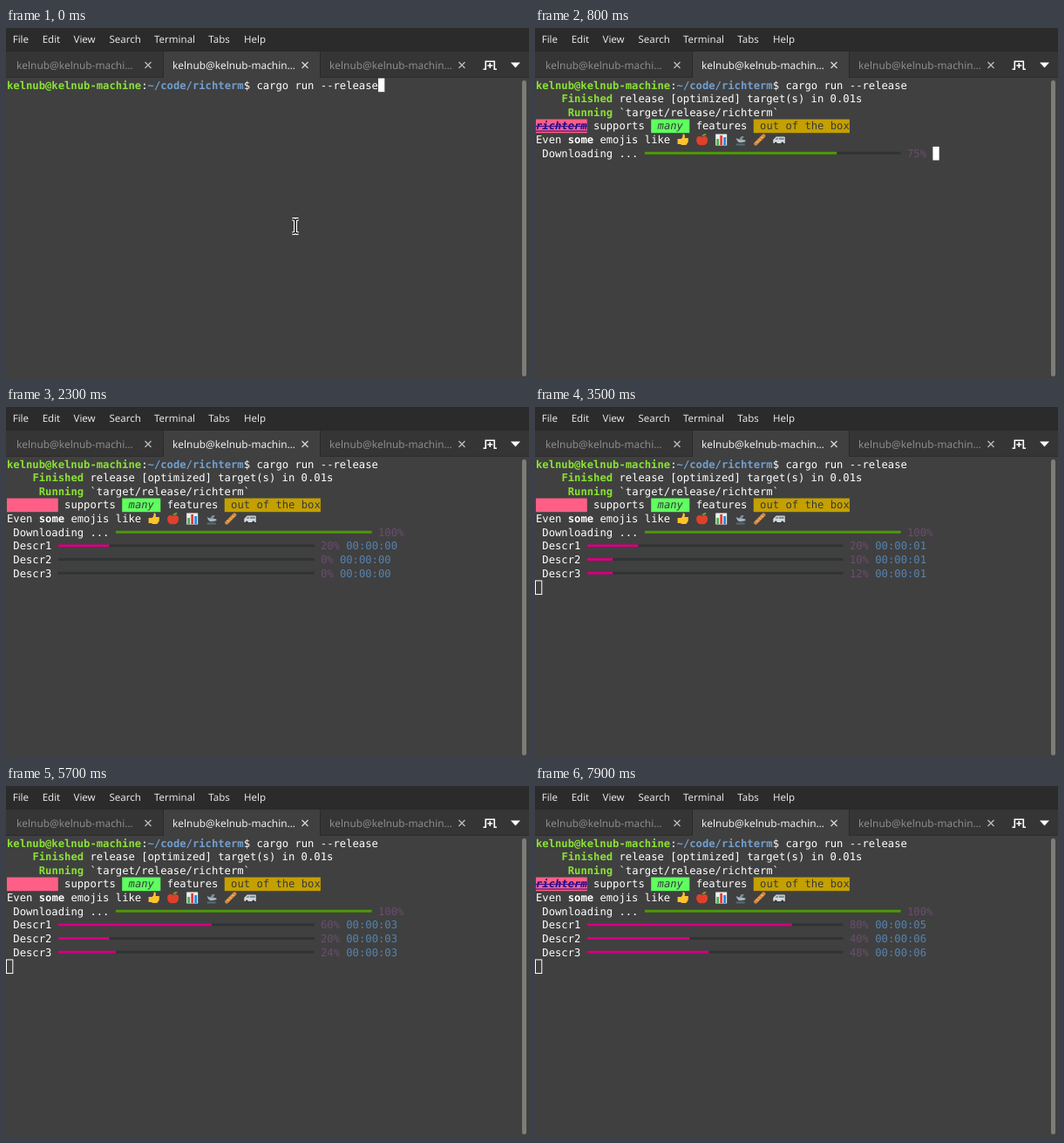
Animation, 600 px wide and 402 px high, one loop 8000 ms. Source, as an HTML page:

```html
<!DOCTYPE html>
<html lang="en">
<head>
<meta charset="utf-8">
<title>Terminal</title>
<style>
  html, body { margin: 0; width: 100%; height: 100%; overflow: hidden; background: #404040; }
  svg { display: block; width: 100vw; height: 100vh; }
  text { white-space: pre; text-rendering: geometricPrecision; }
  .ui { font: 11.5px "Noto Sans", "Open Sans", sans-serif; fill: #e4e4e4; }
  .tab { font-size: 11.85px; fill: #8c8c8c; }
  .tab.on { fill: #f0f0f0; }
  .term { font: 12.2px "DejaVu Sans Mono", monospace; fill: #fff; }
  .bold { font-weight: bold; }
  .green { font-weight: bold; fill: #8ae234; }
  .path { font-weight: bold; fill: #729fcf; }
  .dark { fill: #373a3b; }
  .slant { font-style: italic; }
  .pct { fill: #6c4c70; }
  .time { fill: #5583b0; }
  .fancy { font-weight: bold; font-style: italic; fill: #1a0a8a; }
</style>
</head>
<body>
<svg id="stage" viewBox="0 0 600 402" xmlns="http://www.w3.org/2000/svg">
  <defs>
    <path id="beam" d="M-3.5 -8H-1.5L0 -7L1.5 -8H3.5M0 -7V7M-3.5 8H-1.5L0 7L1.5 8H3.5"/>
  </defs>
  <rect width="600" height="402" fill="#404040"/>
  <rect width="600" height="57" fill="#2b2b2b"/>
  <rect y="26" width="600" height="31" fill="#353535"/>
  <rect x="181" y="26" width="179" height="31" fill="#404040"/>
  <path d="M180.5 26V57M360.5 26V57M0 26.5H600" stroke="#292929"/>
  <path d="M0 56.5H181M360 56.5H600" stroke="#2c2c2c"/>
  <g id="chrome"></g>
  <path d="M547.5 47.3H550.3V38.2H560.3V47.3H563M552.3 43H558.3M555.3 40V46" fill="none" stroke="#fff" stroke-width="1.6"/>
  <path d="M579 39.5H590L584.5 45.5Z" fill="#fff"/>
  <rect x="592" y="60" width="5" height="339" rx="2.5" fill="#7e7c79"/>
  <g id="screen"></g>
  <g id="emojis">
    <path d="M-6 -1H-2C0 -3 0 -4 0 -6.5C2 -7 3 -5 2 -2H6Q7 0 6 1Q7 3 5 4Q5 6 3 6H-1L-3 5H-6Z" fill="#fcc32c"/>
    <g>
      <path d="M0 -3C3 -5 6.5 -4 6.5 0C6.5 4 3.5 7.5 0 6C-3.5 7.5 -6.5 4 -6.5 0C-6.5 -4 -3 -5 0 -3Z" fill="#e0402a"/>
      <path d="M0 -3Q0 -5 -1 -6.5" stroke="#70442a" fill="none"/>
      <path d="M0 -4Q1 -7.5 5 -7Q4 -3.5 0 -4Z" fill="#69a03a"/>
    </g>
    <g>
      <rect x="-6.5" y="-6.5" width="13" height="13" fill="#eceff1"/>
      <path d="M-4 6V-1" stroke="#4caf50" stroke-width="2.8"/>
      <path d="M0 6V-5" stroke="#e53935" stroke-width="2.8"/>
      <path d="M4 6V-3" stroke="#1e88e5" stroke-width="2.8"/>
    </g>
    <g>
      <path d="M-5 -2L-3 -1L-1 0H4Q6 0 6 2Q3 3.5 -2 3Q-4 2 -5 -2Z" fill="#a4b4bc"/>
      <path d="M-2 0L1 -4L4 -4L2 0Z" fill="#78909c"/>
      <path d="M-5 5.5H5" stroke="#546e7a" stroke-width="2"/>
    </g>
    <g transform="rotate(-45)">
      <rect x="-8.5" y="-2.1" width="17" height="4.2" rx="2.1" fill="#d58a3c"/>
      <path d="M-4.5 -1L-3 1M-0.7 -1L0.7 1M3 -1L4.5 1" stroke="#f2c483"/>
    </g>
    <g>
      <path d="M-6.5 3V0L-3 -3.5H6Q7 -3.5 7 -2.5V4H-6Z" fill="#d5dadd"/>
      <path d="M-4.5 0L-2.5 -2.3H-1V0ZM0 -2.3H6V0H0Z" fill="#7f8e96"/>
      <circle cx="-3.5" cy="4" r="1.4" fill="#30363a"/>
      <circle cx="4" cy="4" r="1.4" fill="#30363a"/>
    </g>
  </g>
  <rect id="cursor" width="7.3" height="15.6"/>
  <g id="mouse" fill="none">
    <use href="#beam" stroke="#fff" stroke-width="4"/>
    <use href="#beam" stroke="#1c1c1c" stroke-width="1.7"/>
  </g>
</svg>
<script>
const LOOP = 8000, CELL = 7.345, ROW = 15.65, BAR_CELLS = 40;
const STEPS = [2200, 2700, 3000, 3600, 4200, 4700, 5300, 5800, 6300, 6800, 7300, 7800];
const $ = id => document.getElementById(id);
const colX = c => 1 + c * CELL;
const rowY = r => 57.6 + r * ROW;

function add(parent, tag, attrs, label) {
  const el = document.createElementNS("http://www.w3.org/2000/svg", tag);
  set(el, attrs);
  if (label !== undefined) el.textContent = label;
  return parent.appendChild(el);
}
function set(el, attrs) {
  for (const k in attrs) el.setAttribute(k, attrs[k]);
}
const show = (el, on) => el.setAttribute("visibility", on ? "inherit" : "hidden");
const group = () => add($("screen"), "g", {});
const put = (g, row, col, label, cls = "") =>
  add(g, "text", { x: colX(col), y: rowY(row) + 11.9, class: "term " + cls }, label);
const fillCells = (g, row, col, n, fill) =>
  add(g, "rect", { x: colX(col), y: rowY(row), width: n * CELL, height: ROW, fill });

// Window chrome
[["File", 7.7], ["Edit", 41.7], ["View", 77.5], ["Search", 118.5], ["Terminal", 170], ["Tabs", 232.3], ["Help", 273]]
  .forEach(([label, x]) => add($("chrome"), "text", { x, y: 17.3, class: "ui" }, label));
[["kelnub@kelnub-machi…", 12, ""], ["kelnub@kelnub-machin…", 191, "on"], ["kelnub@kelnub-machin…", 371, ""]]
  .forEach(([label, x, cls], i) => {
    add($("chrome"), "text", { x, y: 46.5, class: "ui tab " + cls }, label);
    add($("chrome"), "path", {
      d: `M${159.5 + i * 180} 39l7 7m0 -7l-7 7`, stroke: cls ? "#d8d8d8" : "#bdbdbd", "stroke-width": 1.3
    });
  });

// Terminal lines
const prompt = group();
put(prompt, 0, 0, "kelnub@kelnub-machine", "green");
put(prompt, 0, 21, ":");
put(prompt, 0, 22, "~/code/richterm", "path");
put(prompt, 0, 37, "$ cargo run --release");

const build = group();
put(build, 1, 4, "Finished", "green");
put(build, 1, 13, "release [optimized] target(s) in 0.01s");
put(build, 2, 5, "Running", "green");
put(build, 2, 13, "`target/release/richterm`");

const styled = group();
fillCells(styled, 3, 0, 8, "#ff5f87");
const blinker = add(styled, "g", {});
put(blinker, 3, 0, "richterm", "fancy");
for (const dy of [8, 13.5]) {
  add(blinker, "rect", { x: 1, y: rowY(3) + dy - 0.6, width: 8 * CELL, height: 1.2, fill: "#3a1090" });
}
put(styled, 3, 9, "supports");
fillCells(styled, 3, 18, 6, "#5fff5f");
put(styled, 3, 19, "many", "dark slant");
put(styled, 3, 25, "features");
fillCells(styled, 3, 34, 15, "#c4a000");
put(styled, 3, 35, "out of the box", "dark");

const emojiLine = group();
put(emojiLine, 4, 0, "Even");
put(emojiLine, 4, 5, "some", "bold");
put(emojiLine, 4, 10, "emojis like");
[...$("emojis").children].forEach((el, i) => {
  const holder = add(emojiLine, "g", { transform: `translate(${colX(22 + 3 * i) + 7} 128)` });
  holder.appendChild(el);
});

function progress(row, label, col, color, timed) {
  const g = group(), y = rowY(row) + 5.9;
  put(g, row, 1, label);
  const line = (fill, n) => add(g, "rect", { x: colX(col), y, width: n * CELL, height: 3, fill });
  line("#303333", BAR_CELLS);
  const bar = line(color, 0);
  const pct = put(g, row, col + 41, "", "pct");
  const time = put(g, row, 0, "", "time");
  return (on, value, secs) => {
    show(g, on);
    bar.setAttribute("width", Math.floor(value * BAR_CELLS / 100) * CELL);
    pct.textContent = value + "%";
    if (!timed) return;
    time.setAttribute("x", colX(col + 42 + pct.textContent.length));
    time.textContent = "00:00:0" + secs;
  };
}
const download = progress(5, "Downloading ...", 17, "#4e9a06", false);
const tasks = [1, 2, 3].map(i => progress(5 + i, "Descr" + i, 8, "#d4007f", true));
const gains = [20, 10, 12];

function drawCursor(t, lit) {
  let row = 9, col = 0;
  if (t < 300) [row, col] = [0, 58];
  else if (t < 400) row = 1;
  else if (t < 500) row = 3;
  else if (t < 600) row = 4;
  else if (t < 1000) [row, col] = [5, t < 900 ? 62 : 63];
  else if (t < 1900) row = 6;
  const hollow = t >= 3500, inset = hollow ? 0.5 : 0;
  set($("cursor"), {
    x: colX(col) - inset, y: rowY(row) + inset,
    fill: hollow ? "none" : "#fff", stroke: hollow ? "#fff" : "none"
  });
  show($("cursor"), t < 1000 || hollow || lit);
}

function drawMouse(t) {
  const drop = Math.max(0, Math.min(1, (t - 1900) / 200));
  show($("mouse"), t < 300 || (t >= 1400 && t < 2100));
  $("mouse").setAttribute("transform", `translate(${t < 300 ? 332 : 331} ${227 + 65 * drop})`);
}

function render(t) {
  const lit = (t + 900) % 1200 < 600;
  show(build, t >= 400);
  show(styled, t >= 500);
  show(blinker, t >= 500 && lit);
  show(emojiLine, t >= 600);
  download(t >= 600, Math.max(0, Math.min(100, Math.floor((t - 500) / 100) * 25)));

  // The tasks advance in turn; the first clock lags one step behind.
  const n = STEPS.filter(s => t >= s).length;
  tasks.forEach((draw, i) => {
    const secs = Math.max(0, Math.floor((i ? n : n - 1) / 2));
    draw(t >= 1900, gains[i] * Math.floor((n + 2 - i) / 3), secs);
  });
  drawCursor(t, lit);
  drawMouse(t);
}

const start = performance.now();
function tick() {
  render((performance.now() - start) % LOOP);
  requestAnimationFrame(tick);
}
render(0);
requestAnimationFrame(tick);
</script>
</body>
</html>
```
